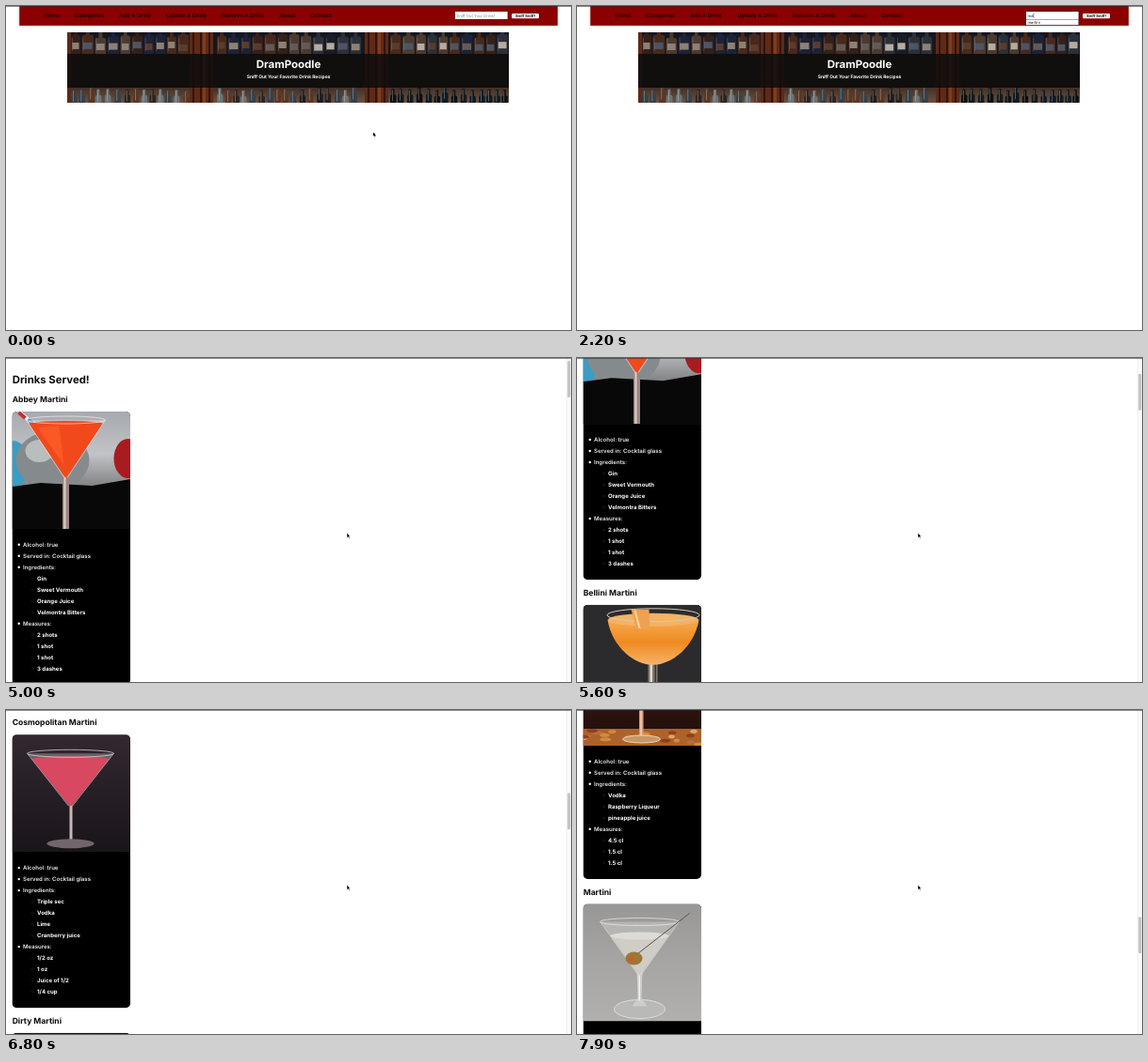
Recreate the animation shown at these times as an HTML page with a canvas. Size 600x345 px, loop 8000 ms.

```html
<!DOCTYPE html>
<html lang="en">
<head>
<meta charset="utf-8">
<title>Drink recipes</title>
<style>
html, body { margin: 0; width: 100%; height: 100%; overflow: hidden; background: #fff; }
canvas { display: block; width: 600px; height: 345px; }
</style>
</head>
<body>
<canvas id="stage"></canvas>
<script>
const W = 600, H = 345, LOOP = 8000, STEP = 100;
const canvas = document.getElementById('stage');
const ctx = canvas.getContext('2d');
const dpr = window.devicePixelRatio || 1;
canvas.width = W * dpr;
canvas.height = H * dpr;

// Drawing helpers
function rect(x, y, w, h, fill) {
  ctx.fillStyle = fill;
  ctx.fillRect(x, y, w, h);
}
function round(x, y, w, h, r, fill) {
  ctx.beginPath();
  ctx.roundRect(x, y, w, h, r);
  ctx.fillStyle = fill;
  ctx.fill();
}
function poly(points, fill) {
  ctx.beginPath();
  for (let i = 0; i < points.length; i += 2) ctx.lineTo(points[i], points[i + 1]);
  ctx.closePath();
  ctx.fillStyle = fill;
  ctx.fill();
}
function oval(x, y, rx, ry, fill, stroke, width = 1) {
  ctx.beginPath();
  ctx.ellipse(x, y, rx, ry, 0, 0, Math.PI * 2);
  if (fill) { ctx.fillStyle = fill; ctx.fill(); }
  if (stroke) { ctx.strokeStyle = stroke; ctx.lineWidth = width; ctx.stroke(); }
}
function line(x1, y1, x2, y2, color, width = 1) {
  ctx.beginPath();
  ctx.moveTo(x1, y1);
  ctx.lineTo(x2, y2);
  ctx.strokeStyle = color;
  ctx.lineWidth = width;
  ctx.stroke();
}
function text(str, x, y, size, weight, color, align = 'left') {
  ctx.font = `${weight} ${size}px Inter, "Open Sans", sans-serif`;
  ctx.textRendering = 'geometricPrecision';
  ctx.textAlign = align;
  ctx.fillStyle = color;
  ctx.fillText(str, x, y);
}
function fade(y0, y1, ...colors) {
  const g = ctx.createLinearGradient(0, y0, 0, y1);
  colors.forEach((c, i) => g.addColorStop(i / (colors.length - 1), c));
  return g;
}
function random(seed) {
  return () => (seed = (seed * 16807) % 2147483647) / 2147483647;
}
function pick(rnd, list) {
  return list[Math.floor(rnd() * list.length)];
}

// Home page
function bottle(x, w, rnd) {
  const glass = pick(rnd, ['#33201a', '#1a1c26', '#2b3038', '#47291c', '#1d2236', '#4c3a30']);
  rect(x + w * 0.33, 28, w * 0.34, 6, glass);
  round(x, 30 + rnd() * 4, w, 24, 2, glass);
  rect(x + 1.5, 38 + rnd() * 3, w - 3, 7, pick(rnd, ['#8d8074', '#625a55', '#b5aca0', '#5a3c2c', '#4d5464']));
  rect(x + 1, 34, 0.8, 14, 'rgba(255,255,255,.2)');
}
function neck(x, rnd, colors) {
  const color = pick(rnd, colors);
  const top = 86 + rnd() * 4;
  rect(x + 1.5, top, 3, 9, color);
  round(x, top + 6, 6.5, 14, 2, color);
  rect(x + 2, top + 1, 0.8, 12, 'rgba(225,225,225,.4)');
}
function banner() {
  const rnd = random(77);
  const clear = ['#35404a', '#1c1d22', '#5a3625', '#6c7478', '#2c2320'];
  const wine = ['#0c1013', '#141b1e', '#0e1a24'];
  ctx.save();
  ctx.beginPath();
  ctx.rect(65, 28, 469, 75);
  ctx.clip();
  rect(65, 28, 469, 75, fade(28, 103, '#141722', '#1a1618', '#2e1d16', '#6a5242'));
  for (const [from, to] of [[69, 194], [224, 378], [408, 532]]) {
    for (let x = from; x < to - 9;) {
      const w = 10 + rnd() * 3;
      bottle(x, w, rnd);
      x += w + 1.5;
    }
    rect(from, 51, to - from, 36, '#251a17');
    for (let x = from; x < to - 5; x += 7.5 + rnd() * 3) neck(x, rnd, from > 400 ? wine : clear);
  }
  for (const x of [195, 381]) {
    rect(x, 28, 25, 75, '#5f2a17');
    for (const dx of [3, 11, 20]) rect(x + dx, 28, 2, 75, '#32150d');
    rect(x + 14, 28, 3, 75, '#7e3d20');
  }
  rect(65, 28, 4, 75, '#5b2a1a');
  rect(65, 51, 469, 36, 'rgba(14,12,13,.86)');
  ctx.restore();
  text('DramPoodle', 300, 65.6, 11.5, 700, '#fff', 'center');
  text('Sniff Out Your Favorite Drink Recipes', 300, 76.7, 4.95, 700, '#fff', 'center');
}
const links = [['Home', 40.5], ['Categories', 73], ['Add A Drink', 120], ['Update A Drink', 170],
  ['Remove A Drink', 229], ['About', 290], ['Contact', 323]];

function home(t) {
  ctx.save();
  ctx.shadowColor = 'rgba(0,0,0,.4)';
  ctx.shadowBlur = 2 * dpr;
  ctx.shadowOffsetY = 0.5 * dpr;
  rect(14.3, 0, 571.4, 20.8, '#8b0000');
  ctx.restore();
  for (const [label, x] of links) text(label, x, 12.2, 5.9, 600, '#1c0000');

  const typed = 'martini'.slice(0, Math.max(0, Math.floor((t - 1700) / 200)));
  if (t >= 1300) round(476.2, 5.3, 57.2, 9.2, 1, '#2b1416');
  rect(477, 6, 55.6, 8, '#fff');
  if (typed) text(typed, 478.5, 11.5, 4.2, 400, '#111');
  else text('Sniff Out Your Drink!', 478.5, 11.5, 4.2, 400, '#858585');
  if (t >= 1300 && (typed || t % 1000 < 500)) {
    const x = 478.7 + (typed ? ctx.measureText(typed).width : 0);
    rect(x, 7.5, 0.5, 5, '#111');
  }
  if (typed) {
    round(476.5, 14, 56.5, 6.8, 1, '#3a1214');
    rect(477, 14.4, 55.5, 5.8, '#fff');
    text('martini', 478.5, 18.6, 4.1, 400, '#111');
  }
  round(537, 8, 29, 5.2, 1, '#f4f1f1');
  text('Sniff Sniff!', 551.5, 12.2, 4.1, 700, '#222', 'center');
  banner();
}

// Drink pictures, each 125 by 125
function martini(cx, rim, half, tip, liquid, level = 6) {
  poly([cx - half, rim, cx + half, rim, cx + 2, tip, cx - 2, tip], 'rgba(235,235,235,.3)');
  const k = half * (1 - level / (tip - rim));
  poly([cx - k, rim + level, cx + k, rim + level, cx + 1, tip, cx - 1, tip], liquid);
  oval(cx, rim + level, k, 3, liquid);
  oval(cx, rim, half, 4, null, 'rgba(245,245,245,.8)', 0.8);
  line(cx - half, rim, cx - 2, tip, 'rgba(245,245,245,.6)', 0.7);
  line(cx + half, rim, cx + 2, tip, 'rgba(245,245,245,.6)', 0.7);
}
function abbey() {
  rect(0, 0, 126, 125, fade(0, 90, '#a6a9ad', '#c2c4c7', '#6c6e70'));
  oval(1, 56, 17, 25, '#3b9cc4');
  oval(43, 52, 39, 31, '#858a8c');
  oval(29, 42, 15, 12, '#b9bdbe');
  oval(123, 50, 15, 21, '#a81c20');
  poly([0, 80, 30, 76, 85, 79, 126, 72, 126, 125, 0, 125], '#090809');
  line(8, 1, 29, 18, '#fff', 4);
  line(7, 1, 14, 7, '#c72f35', 4);
  line(17, 8, 22, 13, '#4b8fbc', 4);
  rect(53.5, 66, 7, 59, '#9b8580');
  rect(55, 68, 2, 57, '#e0d0cb');
  martini(57, 9, 42, 70, '#f1491c', 4);
  poly([27, 17, 50, 15, 55, 57], '#fa5824');
}
function bellini() {
  rect(0, 0, 126, 125, '#2b2b2d');
  poly([0, 83, 45, 91, 126, 110, 126, 125, 0, 125], '#71808e');
  poly([0, 106, 70, 116, 98, 125, 0, 125], '#a1a9b0');
  rect(69, 60, 10, 65, '#817770');
  rect(71, 62, 2.5, 63, '#e2dcd1');
  rect(76, 62, 1.5, 63, '#44342b');
  ctx.beginPath();
  ctx.moveTo(26, 16);
  ctx.bezierCurveTo(31, 46, 55, 64, 74, 64);
  ctx.bezierCurveTo(94, 64, 118, 45, 123, 16);
  ctx.closePath();
  ctx.fillStyle = fade(15, 64, '#f6ad52', '#ef8a20', '#f5b369');
  ctx.fill();
  oval(74.5, 16, 48, 7, '#f3b264');
  oval(74.5, 11, 49, 7, null, '#d9c9b5', 1);
  poly([51, 5, 70, 5, 71, 24, 57, 27], '#f0a052');
  line(55, 6, 60, 25, '#ffd9a0', 2);
}
function cosmo() {
  rect(0, 0, 126, 125, fade(0, 125, '#322830', '#19151a'));
  rect(61, 72, 3, 44, '#c5b8bd');
  oval(62, 116, 25, 5, '#72656b');
  martini(62, 20, 46, 76, '#d84860');
}
function dirty() {
  rect(0, 0, 126, 125, fade(0, 90, '#15170f', '#1f1d19'));
  poly([24, 55, 47, 52, 49, 68, 26, 70], '#c9ccce');
  poly([1, 98, 31, 78, 124, 79, 113, 119, 18, 123], '#ecd9b0');
  poly([8, 98, 35, 83, 117, 84, 107, 114, 22, 118], '#cfb384');
  poly([16, 93, 62, 85, 88, 111, 39, 124], '#0f1519');
  oval(82, 74, 23, 17, '#8f8777', '#d8d1c1', 1);
  for (const [x, y] of [[74, 67], [86, 68], [94, 77], [80, 79]]) oval(x, y, 9, 6, y < 70 ? '#d9692b' : '#2c1713');
  rect(48.5, 71, 3, 46, '#9caaa5');
  oval(50, 117, 17, 4, null, '#697472', 1);
  martini(50, 11, 49, 73, '#2f3d2c');
  poly([18, 24, 40, 18, 48, 64], '#5f7d78');
  poly([60, 20, 84, 22, 56, 56], '#475c3c');
  line(43, 14, 62, 60, '#c4b56d', 1);
  oval(53, 36, 9, 6, '#a6a33f');
  oval(56, 54, 9, 6, '#868d32');
  oval(57, 36, 3, 3, '#cf6a24');
}
function espresso() {
  rect(0, 0, 126, 125, fade(0, 125, '#4d3a30', '#211713'));
  poly([3, 25, 118, 25, 64, 92, 57, 92], '#4a2717');
  rect(58, 90, 5, 35, '#8c7b70');
  oval(60, 24, 58, 18, '#cdb292', '#eee5d9', 2);
  oval(60, 25, 51, 14, '#dcc4a4');
  for (const [x, y] of [[48, 20], [60, 17], [55, 24]]) oval(x, y, 5, 2.5, '#2b1a15');
}
function french() {
  rect(0, 0, 126, 125, fade(0, 108, '#2c0f10', '#3b160e', '#24100c'));
  rect(0, 107, 126, 18, '#ac622b');
  const rnd = random(19);
  for (let i = 0; i < 18; i++) {
    oval(rnd() * 126, 109 + rnd() * 16, 3 + rnd() * 4, 2, pick(rnd, ['#d38a3e', '#8f3f20', '#e2a662', '#b46f3f']));
  }
  rect(59.5, 72, 4.5, 45, '#d59a78');
  rect(61, 72, 1, 45, '#ffe2c8');
  oval(62, 118, 20, 4, '#c99668', '#f3d7ad', 1);
  martini(62, 18, 46, 76, '#bf5360');
}
function classic() {
  rect(0, 0, 126, 125, fade(0, 125, '#989795', '#a6a5a3', '#b1b0ae'));
  oval(60, 112, 27, 10, '#b9b9b7', '#dededc', 1);
  poly([57, 70, 63, 70, 62, 100, 68, 109, 52, 109, 58, 100], '#cecdca');
  rect(59, 76, 1.5, 27, '#f0f0ee');
  martini(60, 19, 42, 75, '#cfcdc5', 15);
  oval(60, 34, 31, 4, '#dddbd5');
  line(49, 60, 113, 10, '#55534f', 1);
  oval(54, 58, 9, 7, '#9c7836');
  oval(51, 59, 3, 3, '#c95f29');
}

// Results page
const drinks = [
  ['Abbey Martini', abbey, 'Gin|Sweet Vermouth|Orange Juice|Velmontra Bitters', '2 shots|1 shot|1 shot|3 dashes'],
  ['Bellini Martini', bellini, 'Ice|Vodka|Peach nectar|Peach schnapps|Lemon peel', '8 cubes|3 oz|1.5 oz|1.5 oz|1'],
  ['Cosmopolitan Martini', cosmo, 'Triple sec|Vodka|Lime|Cranberry juice', '1/2 oz|1 oz|Juice of 1/2|1/4 cup'],
  ['Dirty Martini', dirty, 'Vodka|Dry Vermouth|Olive Brine|Lemon|Olive', '70ml/2fl oz|1 tbsp|2 tbsp|1 wedge|1'],
  ['Espresso Martini', espresso, 'Vodka|Coffee liqueur|Sugar syrup', '5 cl|1 cl|1 dash'],
  ['French Martini', french, 'Vodka|Raspberry Liqueur|pineapple juice', '4.5 cl|1.5 cl|1.5 cl'],
  ['Martini', classic, 'Gin|Dry Vermouth|Olive', '1 2/3 oz|1/3 oz|1']
];
let nextTop = 57;
const cards = drinks.map(([name, photo, ingredients, measures]) => {
  const sub = list => list.split('|').map(s => [s, true]);
  const rows = [['Alcohol: true'], ['Served in: Cocktail glass'], ['Ingredients:'], ...sub(ingredients),
    ['Measures:'], ...sub(measures)];
  const card = { name, photo, rows, top: nextTop, height: 147 + rows.length * 12 };
  nextTop += card.height + 26.5;
  return card;
});

function drawCard({ name, photo, rows, top, height }) {
  text(name, 6.7, top - 9.8, 8.55, 700, '#0a0a0a');
  ctx.save();
  ctx.translate(6.5, top);
  ctx.beginPath();
  ctx.roundRect(0, 0, 125.5, height, 5);
  ctx.clip();
  rect(0, 0, 126, height, '#000');
  ctx.beginPath();
  ctx.rect(0, 0, 126, 125);
  ctx.clip();
  photo();
  ctx.restore();
  rows.forEach(([label, nested], i) => {
    const y = top + 141.8 + i * 12;
    if (nested) oval(28.5, y, 1.1, 1.1, null, '#2b2b2b', 0.5);
    else oval(13.7, y, 1.2, 1.2, '#fff');
    text(label, nested ? 33 : 18, y + 2.1, 6.05, nested ? 700 : 600, nested ? '#fff' : '#ececec');
  });
}

// Smooth curve through [time, ...values] stops
function track(stops, t) {
  const last = stops.length - 1;
  if (t <= stops[0][0]) return stops[0].slice(1);
  if (t >= stops[last][0]) return stops[last].slice(1);
  const i = stops.findIndex(s => s[0] > t) - 1;
  const [a, b] = [stops[i], stops[i + 1]];
  const span = b[0] - a[0], u = (t - a[0]) / span;
  const slope = (j, k) => {
    if (j === 0) return 0;
    const p = stops[j - 1], n = stops[Math.min(j + 1, last)];
    return (n[k] - p[k]) / (n[0] - p[0]);
  };
  return a.slice(1).map((v, n) => {
    const k = n + 1;
    return v * (1 + 2 * u) * (1 - u) ** 2 + b[k] * u * u * (3 - 2 * u)
      + span * u * (1 - u) * ((1 - u) * slope(i, k) - u * slope(i + 1, k));
  });
}
const scrollStops = [[5000, 0], [6200, 361], [7300, 1054.5], [7900, 1755.5]];

function results(t) {
  const [scroll] = track(scrollStops, t);
  ctx.save();
  ctx.translate(0, -scroll);
  text('Drinks Served!', 6.7, 27.2, 11.35, 700, '#0a0a0a');
  for (const card of cards) {
    if (card.top - 25 < scroll + H && card.top + card.height > scroll) drawCard(card);
  }
  ctx.restore();
  rect(595, 0, 5, H, '#fafafa');
  rect(595, 0, 0.5, H, '#e8e8e8');
  round(596.3, 3 + scroll / 8.08, 3, 39, 1.5, '#c1c1c1');
}

// Pointer
function mix(a, b, from, to, t) {
  const u = Math.min(1, Math.max(0, (t - from) / (to - from)));
  const e = u * u * (3 - 2 * u);
  return a.map((v, i) => v + (b[i] - v) * e);
}
function pointer(t) {
  if (t >= 1900 && t < 3900) return;
  const [x, y] = t < 1900
    ? (t < 1000 ? mix([390, 134.5], [490.5, 13.5], 0, 1000, t) : mix([490.5, 13.5], [491, 10], 1000, 1300, t))
    : mix([430, 96], [362.2, 186.8], 3800, 4600, t);
  ctx.save();
  ctx.translate(x, y);
  ctx.beginPath();
  for (const [px, py] of [[0, 0], [0, 4.2], [1, 3.3], [1.8, 5], [2.5, 4.6], [1.8, 3], [3, 3]]) ctx.lineTo(px, py);
  ctx.closePath();
  ctx.strokeStyle = '#fff';
  ctx.lineWidth = 0.7;
  ctx.stroke();
  ctx.fillStyle = '#000';
  ctx.fill();
  ctx.restore();
}

function draw(t) {
  ctx.setTransform(dpr, 0, 0, dpr, 0, 0);
  rect(0, 0, W, H, '#fff');
  if (t < 3900) home(t);
  else results(t);
  rect(0, 0, W, 1, 'rgba(40,40,44,.545)');
  pointer(t);
}

let start, shown = -1;
function tick(now) {
  start ??= now;
  const t = Math.floor(((now - start) % LOOP) / STEP) * STEP;
  if (t !== shown) draw(shown = t);
  requestAnimationFrame(tick);
}
requestAnimationFrame(tick);
</script>
</body>
</html>
```
